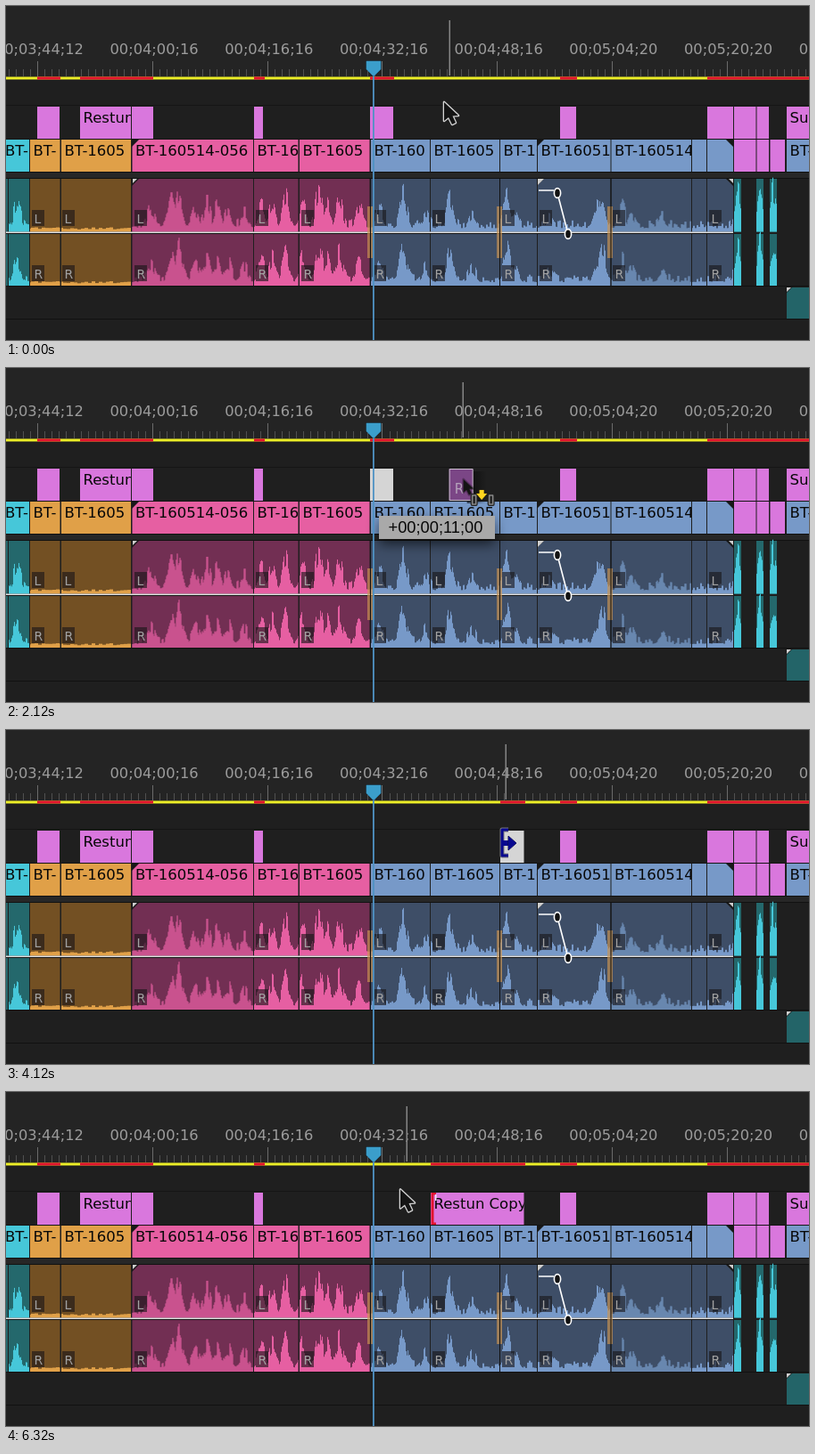
Recreate the animation shown at these times as an HTML page with a canvas. Size 900 by 375 pixels, loop 6440 ms.

```html
<!DOCTYPE html>
<html lang="en">
<head>
<meta charset="utf-8">
<title>Timeline edit</title>
<style>
html, body { margin: 0; width: 100%; height: 100%; overflow: hidden; background: #222; }
canvas { display: block; width: 900px; height: 375px; }
</style>
</head>
<body>
<canvas id="stage" width="900" height="375"></canvas>
<script>
const W = 900, H = 375, LOOP = 6440, STEP = 40;
const SECOND = 8.06, FPS = 60;
const PINK = '#d977dd', BLUE = '#7799c8', ROSE = '#e65fa2', ORANGE = '#e0a048', CYAN = '#46c7d9';
const SELECTED = '#d5d5d5', RED = '#e3142f', YELLOW = '#ecee27';
const LABEL = '16.5px "DejaVu Sans", sans-serif';
const HOME = 408, DROP = 554, CLIP_END = 580.5;

const view = document.getElementById('stage').getContext('2d');
const base = document.createElement('canvas');
base.width = W;
base.height = H;
let c = base.getContext('2d');

function box(x, y, w, h, color) {
  c.fillStyle = color;
  c.fillRect(x, y, w, h);
}

function poly(points, fill, stroke, width) {
  c.beginPath();
  points.forEach(([x, y]) => c.lineTo(x, y));
  c.closePath();
  if (stroke) {
    c.strokeStyle = stroke;
    c.lineWidth = width;
    c.lineJoin = 'round';
    c.stroke();
  }
  c.fillStyle = fill;
  c.fill();
}

function text(s, x, y, color, font) {
  c.font = font;
  c.fillStyle = color;
  c.fillText(s, x, y);
}

function clip(x0, x1, y, h, color, label, labelX = x0 + 3.5) {
  box(x0, y, x1 - x0, h, color);
  if (!label) return;
  c.save();
  c.beginPath();
  c.rect(x0, y, x1 - x0, h);
  c.clip();
  text(label, labelX, y + 18, '#080808', LABEL);
  c.restore();
}

const titleClip = (x0, x1, color = PINK, label) => clip(x0, x1, 113, 36, color, label);
const mainClip = (x0, x1, color, label, labelX) => clip(x0, x1, 150, 36, color, label, labelX);

function noise(n) {
  const v = Math.sin(n * 127.1 + 11.7) * 43758.5453;
  return v - Math.floor(v);
}

// [x, height] of the louder moments
const peaks = [
  [12, 30], [162, 25], [185, 38], [194, 42], [212, 22], [225, 29], [236, 26], [248, 26], [267, 18],
  [286, 34], [298, 28], [313, 44], [332, 30], [350, 50], [359, 28], [373, 40], [395, 28],
  [418, 22], [445, 48], [470, 16], [497, 44], [522, 17], [561, 44], [570, 24], [608, 12],
  [662, 26], [668, 42], [690, 26], [700, 18], [735, 12], [820, 52], [845, 50], [860, 50]
];

function level(x, channel) {
  let h = 0;
  for (const [px, ph] of peaks) h = Math.max(h, ph * Math.exp(-(((x - px) / 5) ** 2)));
  const n = noise(Math.floor(x / 2) + channel * 0.013);
  return 4 + 9 * n * n + h * (0.55 + 0.45 * n);
}

function audio(x0, x1, back, color, quiet) {
  for (let ch = 0; ch < 2; ch++) {
    const top = ch ? 256 : 194, bottom = ch ? 314 : 253.5;
    box(x0, top, x1 - x0, bottom - top, back);
    for (let x = x0; x < x1; x++) {
      const h = quiet ? 2.5 + 2.5 * noise(x >> 2) : level(x, ch);
      box(x, bottom - h, Math.min(1, x1 - x), h, color);
    }
  }
}

function badge(x, y, letter) {
  box(x, y, 14, 18, 'rgba(25,22,25,.62)');
  text(letter, x + 2.5, y + 14.5, '#a2a2a2', '14px "DejaVu Sans", sans-serif');
}

function drawBase() {
  box(0, 0, W, 82, '#242424');
  box(0, 82, W, H - 82, '#1f1f1f');
  box(0, 111, W, 1, '#151515');
  box(0, 149, W, 1, '#151515');
  box(0, 187, W, 6, '#272727');
  box(0, 186, W, 1, '#111');
  box(0, 193, W, 1, '#111');
  box(0, 314, W, 1, '#111');
  box(0, 351, W, 1, '#111');

  for (let i = -5; i < 112; i++) {
    const major = (i + 160) % 16 === 0;
    box(Math.round(35.3 + i * 8.045), major ? 62 : 71, 1, major ? 17 : 8, major ? '#6b6b6b' : '#505050');
  }
  ['03;44;12', '04;00;16', '04;16;16', '04;32;16', '04;48;16', '05;04;20', '05;20;20', '05;36;20']
    .forEach((s, i) => text('00;' + s, -12.2 + i * 128.7, 54, '#9c9c9c', '16.25px "DejaVu Sans", sans-serif'));

  box(0, 79.5, W, 3, YELLOW);
  [[35, 61], [83, 165], [278, 290], [621, 640], [786, 900]].forEach(([a, b]) => box(a, 79.5, b - a, 3, RED));

  titleClip(35, 60);
  titleClip(83, 140, PINK, 'Restun');
  [[141, 165], [278, 288], [621, 639], [786, 815], [816, 840.5], [841.5, 855]].forEach(([a, b]) => titleClip(a, b));
  titleClip(875, 900, PINK, 'Sul');

  mainClip(0, 26, CYAN, 'BT-16', -1);
  mainClip(27, 60.5, ORANGE, 'BT-');
  mainClip(62, 140, ORANGE, 'BT-1605');
  mainClip(141.5, 277, ROSE, 'BT-160514-056');
  mainClip(278, 327.5, ROSE, 'BT-16');
  mainClip(329, 407.5, ROSE, 'BT-1605');
  mainClip(409, 475, BLUE, 'BT-160');
  mainClip(476, 553, BLUE, 'BT-1605');
  mainClip(554, 595, BLUE, 'BT-16');
  mainClip(596, 677.5, BLUE, 'BT-16051');
  mainClip(678.5, 768, BLUE, 'BT-160514');
  mainClip(769, 785, BLUE);
  mainClip(786, 815, BLUE);
  mainClip(816, 840.5, PINK);
  mainClip(841.5, 855, PINK);
  mainClip(856.5, 873, PINK);
  mainClip(875, 900, BLUE, 'BT-16');

  audio(3, 26, '#24686c', CYAN);
  box(0, 194, 2, 60, '#24686c');
  box(0, 256, 2, 58, '#24686c');
  audio(27, 60.5, '#735023', ORANGE, true);
  audio(62, 140, '#735023', ORANGE, true);
  [[141.5, 277], [278, 327.5], [329, 407.5]].forEach(([a, b]) => audio(a, b, '#722f53', ROSE));
  [[409, 475], [476, 553], [554, 595], [596, 677.5], [678.5, 768], [769, 785], [786, 815]]
    .forEach(([a, b]) => audio(a, b, '#3e4e67', BLUE));
  [[816, 824], [841, 849], [856, 864]].forEach(([a, b]) => audio(a, b, '#24686c', CYAN));
  box(0, 253.5, 815, 1.6, '#dedede');
  box(0, 255, 815, 1, '#151515');
  [405, 550, 674].forEach(x => box(x, 225, 6, 58, 'rgba(205,150,80,.65)'));
  [408, 553, 677.5].forEach(x => box(x, 194, 1, 120, '#111'));

  [29, 63, 144, 280, 331, 412, 478, 556, 598, 680, 788].forEach(x => {
    badge(x, 229, 'L');
    badge(x, 291, 'R');
  });

  [150, 194].forEach(y => {
    [141, 595].forEach(x => poly([[x, y], [x + 8, y], [x, y + 8]], '#181818'));
    poly([[807, y], [816, y], [816, y + 9]], '#181818');
  });
  poly([[596, 194], [603, 194], [596, 201]], '#cfcfcf');
  poly([[142, 194], [147, 194], [142, 199]], '#cfcfcf');
  poly([[815, 194], [810, 194], [815, 199]], '#cfcfcf');

  c.strokeStyle = '#fff';
  c.lineWidth = 1.6;
  c.beginPath();
  c.moveTo(597, 207);
  c.lineTo(614, 207);
  c.moveTo(618, 210);
  c.lineTo(630, 256);
  c.stroke();
  [[618, 210], [630, 256]].forEach(([x, y]) => {
    c.beginPath();
    c.ellipse(x, y, 3.6, 5.4, 0, 0, 7);
    c.fillStyle = '#111';
    c.fill();
    c.stroke();
  });

  box(875, 316, 25, 35, '#236468');
  poly([[874, 315], [882, 315], [874, 323]], '#1a1a1a');
  poly([[875, 316], [880, 316], [875, 321]], '#d0d0d0');
}

function track(t, keys, smooth = true) {
  let [t0, v0] = keys[0];
  for (const [t1, v1] of keys) {
    if (t < t1) {
      const p = Math.max(0, (t - t0) / (t1 - t0));
      return v0 + (v1 - v0) * (smooth ? p * p * (3 - 2 * p) : p);
    }
    [t0, v0] = [t1, v1];
  }
  return v0;
}

const toPx = frames => frames / FPS * SECOND;
const pad = n => String(n).padStart(2, '0');

function timecode(frames) {
  const n = Math.round(Math.abs(frames));
  return `00;00;${pad(Math.floor(n / FPS))};${pad(n % FPS)}`;
}

function snapTo(frames, targets, reach) {
  return targets.find(f => Math.abs(f - frames) <= reach);
}

function snapLine(x, marks) {
  box(x - 0.8, 83, 1.7, H - 83, '#050505');
  marks.forEach(y => poly([[x - 9, y], [x + 9, y], [x + 2, y + 6], [x, y + 11], [x - 2, y + 6]], '#e4e4e4'));
}

function tooltip(s, x, y, w) {
  c.save();
  c.shadowColor = 'rgba(0,0,0,.6)';
  c.shadowBlur = 14;
  c.shadowOffsetY = 6;
  box(x, y, w, 26, '#a9a9a9');
  c.restore();
  text(s, x + 10.5, y + 19, '#080808', '18.3px "Liberation Sans", Arial, sans-serif');
}

const ARROW = [[0, 0], [0, 21], [5, 17], [9, 25], [13, 23], [9.5, 15.5], [16, 15]];

function pointer(x, y, scale = 1, outline = '#d4d4d4') {
  poly(ARROW.map(([a, b]) => [x + a * scale, y + b * scale]), '#141414', outline, 2.6);
}

function overwriteCursor(x, y) {
  pointer(x, y, 0.7, 'rgba(0,0,0,.3)');
  [[9, 1], [28, 1]].forEach(([dx]) => {
    c.strokeStyle = '#222';
    c.lineWidth = 4;
    c.strokeRect(x + dx + 1, y + 18, 4, 10);
    c.strokeStyle = '#888';
    c.lineWidth = 1.5;
    c.strokeRect(x + dx + 1, y + 18, 4, 10);
  });
  const ax = x + 20.5, ay = y + 12;
  poly([[ax - 2.5, ay], [ax + 2.5, ay], [ax + 2.5, ay + 4], [ax + 6, ay + 4], [ax, ay + 11],
    [ax - 6, ay + 4], [ax - 2.5, ay + 4]], '#ffd51f', '#3c3010', 1);
}

function trimCursor(x, y) {
  [['#77777c', 5], ['#08088f', 3]].forEach(([color, width]) => {
    c.strokeStyle = color;
    c.lineWidth = width;
    c.beginPath();
    c.moveTo(x + 9, y + 2);
    c.lineTo(x + 2, y + 2);
    c.lineTo(x + 2, y + 31);
    c.lineTo(x + 9, y + 31);
    c.stroke();
  });
  box(x + 3, y + 14, 7, 6, '#08088f');
  poly([[x + 9, y + 9], [x + 18, y + 17], [x + 9, y + 25]], '#08088f', '#11113a', 1);
}

function ghost(x) {
  const g = c.createLinearGradient(x + 20, 0, x + 42, 0);
  g.addColorStop(0, 'rgba(0,0,0,.6)');
  g.addColorStop(1, 'rgba(0,0,0,0)');
  box(x + 20, 116, 22, 36, g);
  box(x, 113, 26.5, 36, '#7b4686');
  c.strokeStyle = '#c9bccd';
  c.lineWidth = 1;
  c.strokeRect(x + 0.5, 113.5, 26, 35);
  text('R', x + 6, 141, '#b5a2bb', '15px "DejaVu Sans", sans-serif');
}

function trimPreview(x) {
  box(x, 113, CLIP_END + 1 - x, 36, '#f4f4f4');
  box(x + 2, 116, CLIP_END - x - 3, 31, PINK);
  box(x + 2, 116, Math.min(3, DROP - x), 31, '#e9e9e9');
  box(DROP - 1, 113, 8, 5, CYAN);
  box(DROP, 117, 3, 29, RED);
  box(DROP + 3, 117, 3, 29, '#f0b8ee');
  box(CLIP_END - 21, 113, 20, 4, '#2f9331');
  box(CLIP_END - 4, 113, 3.5, 36, '#2f9331');
}

function playhead() {
  box(411, 76, 1.8, H - 76, '#4f92c4');
  poly([[404, 62], [420, 62], [420, 71], [413, 78], [411, 78], [404, 71]], '#3b9ecb', '#1c5f80', 1);
}

function draw(t) {
  c.drawImage(base, 0, 0);
  const dragging = t >= 1400 && t < 3240;
  const dropped = t >= 3240;
  const trimming = t >= 4960 && t < 5640;
  const trimmed = t >= 5640;

  const move = track(t, [[1400, 0], [2120, 660], [2720, 1030], [2840, 1030], [2960, 1088]], false);
  const trim = track(t, [[4960, 0], [5080, -30], [5560, -581]]);
  const moveSnap = snapTo(move, [502, 1088], 44);
  const trimSnap = snapTo(trim, [-30, -581], 18);
  const moved = moveSnap ?? move, cut = trimSnap ?? trim;
  const left = DROP + 0.2 + toPx(cut);

  let hover;
  if (t < 1400) hover = track(t, [[40, 497], [680, 425], [1400, 423]]);
  else if (t < 3600) hover = 423 + toPx(move);
  else if (t < 4960) hover = track(t, [[3600, 569], [4120, 560], [4880, 558]]);
  else if (t < 5680) hover = 558 + toPx(trim);
  else hover = track(t, [[5680, 480], [6320, 449]]);
  const tipY = track(t, [[40, 108], [680, 127], [1400, 126], [2120, 125], [2960, 124],
    [3600, 124], [4120, 127], [5680, 127], [6320, 109.5]]);
  const tipX = hover + track(t, [[1400, -6], [2120, 1], [2720, -5], [2960, -7]]);

  box(Math.round(hover) - 0.5, 16, 1.5, 62, '#858585');

  if (!dropped) {
    box(408, 79.5, 27, 3, RED);
    titleClip(HOME, 434, t >= 1000 ? SELECTED : PINK);
  } else {
    const redLeft = trimmed ? 476 : DROP;
    box(redLeft, 79.5, 582 - redLeft, 3, RED);
    if (trimming) {
      if (trimSnap !== undefined) snapLine(left, trimSnap === -30 ? [194] : [150, 194]);
      trimPreview(left);
    } else if (trimmed) {
      titleClip(476, CLIP_END, PINK, 'Restun Copy');
      box(476.5, 113, 3, 36, RED);
      box(479, 113, 3, 2.5, RED);
      box(479, 146.5, 3, 2.5, RED);
      box(481, 115, 1.5, 7, '#f5e6f5');
    } else {
      titleClip(DROP, CLIP_END, t < 4880 ? SELECTED : PINK);
      if (t >= 4880) box(DROP, 113, 3, 36, RED);
    }
  }

  if (dragging) {
    const x = HOME + toPx(moved);
    if (moveSnap !== undefined) snapLine(x, [150, 194]);
    ghost(x);
    tooltip('+' + timecode(moved), 418, 166, 130);
  }
  if (trimming) tooltip(`-${timecode(cut)} Duration: ${timecode(211 - cut)}`, 555, 184, 306);

  playhead();

  if (dragging) overwriteCursor(tipX, tipY);
  else if (t >= 3960 && t < 5760) {
    trimCursor(hover + track(t, [[4960, -6], [5080, -15], [5560, -12]]),
      track(t, [[4280, 110], [5080, 107]]));
  } else pointer(tipX, tipY);
}

drawBase();
c = view;

function tick(now) {
  draw(Math.floor((now % LOOP) / STEP) * STEP);
  requestAnimationFrame(tick);
}
draw(0);
requestAnimationFrame(tick);
</script>
</body>
</html>
```
